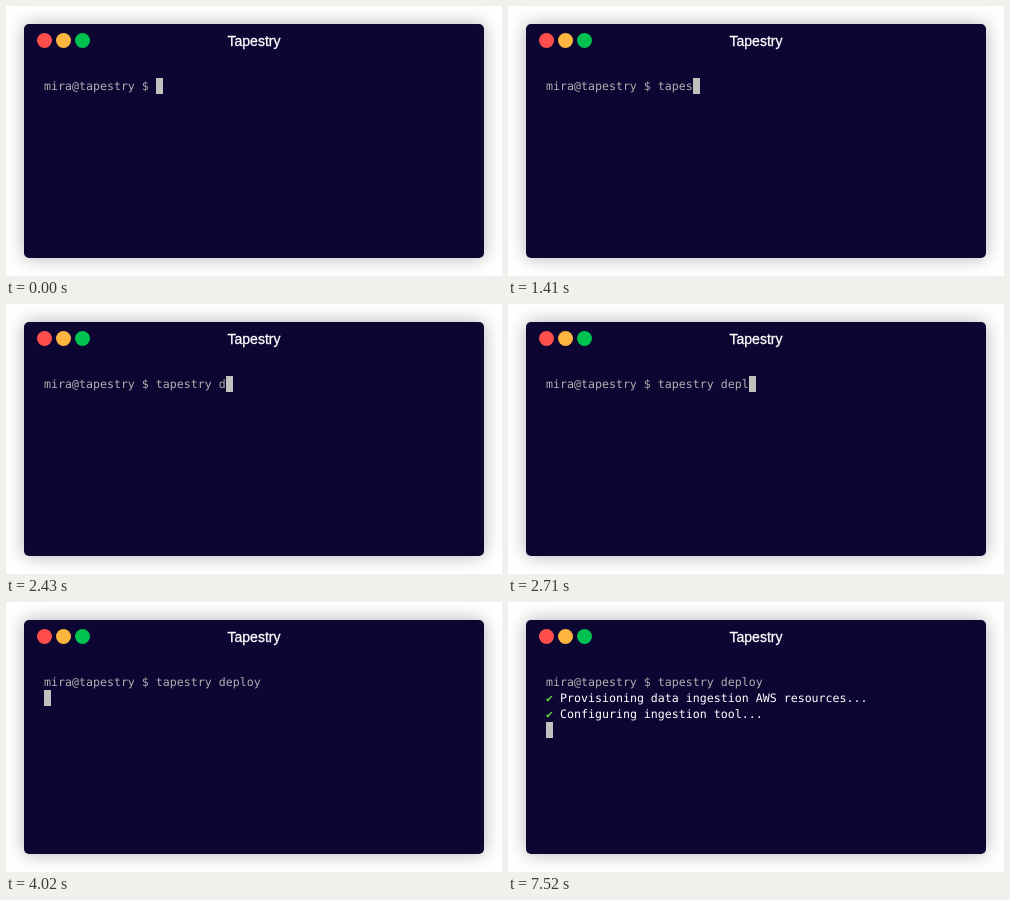
These frames come from a looping animation (496 by 270 pixels, 8 s). An HTML page:

```html
<!DOCTYPE html>
<html lang="en">
<head>
<meta charset="utf-8">
<title>Tapestry</title>
<style>
  html, body { margin: 0; width: 100%; height: 100%; overflow: hidden; background: #fff; }
  svg { display: block; width: 496px; height: 270px; }
  .window { fill: #0d0633; filter: drop-shadow(0 0 9px rgba(0, 0, 0, .3)); }
  .title {
    font: 14px "Liberation Sans", Arial, sans-serif;
    fill: #fff; stroke: #fff; stroke-width: .3px; text-anchor: middle;
  }
  .line {
    font: 11.627px "DejaVu Sans Mono", monospace;
    fill: #fff; white-space: pre; text-rendering: geometricPrecision;
  }
  .prompt { fill: #b0b0b0; }
  .check { fill: #5fd13a; }
  .cursor { fill: #c1c1bf; }
</style>
</head>
<body>
<svg viewBox="0 0 496 270">
  <rect class="window" x="18" y="18" width="460" height="234" rx="5"/>
  <circle cx="38.5" cy="34.5" r="7.5" fill="#ff4f4d"/>
  <circle cx="57.5" cy="34.5" r="7.5" fill="#feb53f"/>
  <circle cx="76.5" cy="34.5" r="7.5" fill="#00c251"/>
  <text class="title" x="248" y="40">Tapestry</text>
  <text class="line prompt" id="prompt" x="38" y="84"></text>
  <g id="output"></g>
  <rect class="cursor" id="cursor" width="7" height="16"/>
</svg>
<script>
  const LOOP = 8000;
  const LEFT = 38, TOP = 72, CHAR = 7, ROW = 16;
  const PROMPT = 'mira@tapestry $ ';
  const COMMAND = 'tapestry deploy';
  const KEY_TIMES = [1000, 1060, 1200, 1260, 1410, 1510, 1670, 1780, 1880,
                     2430, 2480, 2670, 2710, 2910, 3020];
  const ENTER = 4020;
  const STEPS = [
    { at: 6020, text: 'Provisioning data ingestion AWS resources...' },
    { at: 7520, text: 'Configuring ingestion tool...' }
  ];

  const byId = id => document.getElementById(id);
  const prompt = byId('prompt'), output = byId('output'), cursor = byId('cursor');

  function addText(parent, cls, x, y, text) {
    const el = document.createElementNS('http://www.w3.org/2000/svg', 'text');
    el.setAttribute('class', cls);
    el.setAttribute('x', x);
    el.setAttribute('y', y);
    el.textContent = text;
    parent.append(el);
  }

  STEPS.forEach((step, i) => {
    step.el = document.createElementNS('http://www.w3.org/2000/svg', 'g');
    const y = TOP + 12 + (i + 1) * ROW;
    addText(step.el, 'line check', LEFT, y, '✔');
    addText(step.el, 'line', LEFT + 2 * CHAR, y, step.text);
    output.append(step.el);
  });

  function render(t) {
    const typed = KEY_TIMES.filter(k => k <= t).length;
    const done = STEPS.filter(s => s.at <= t).length;
    const entered = t >= ENTER;

    prompt.textContent = PROMPT + COMMAND.slice(0, typed);
    STEPS.forEach((s, i) => s.el.setAttribute('visibility', i < done ? 'visible' : 'hidden'));

    const col = entered ? 0 : PROMPT.length + typed;
    const row = entered ? 1 + done : 0;
    cursor.setAttribute('x', LEFT + col * CHAR);
    cursor.setAttribute('y', TOP + row * ROW);
  }

  const start = performance.now();
  function tick() {
    render((performance.now() - start) % LOOP);
    requestAnimationFrame(tick);
  }
  render(0);
  requestAnimationFrame(tick);
</script>
</body>
</html>
```
